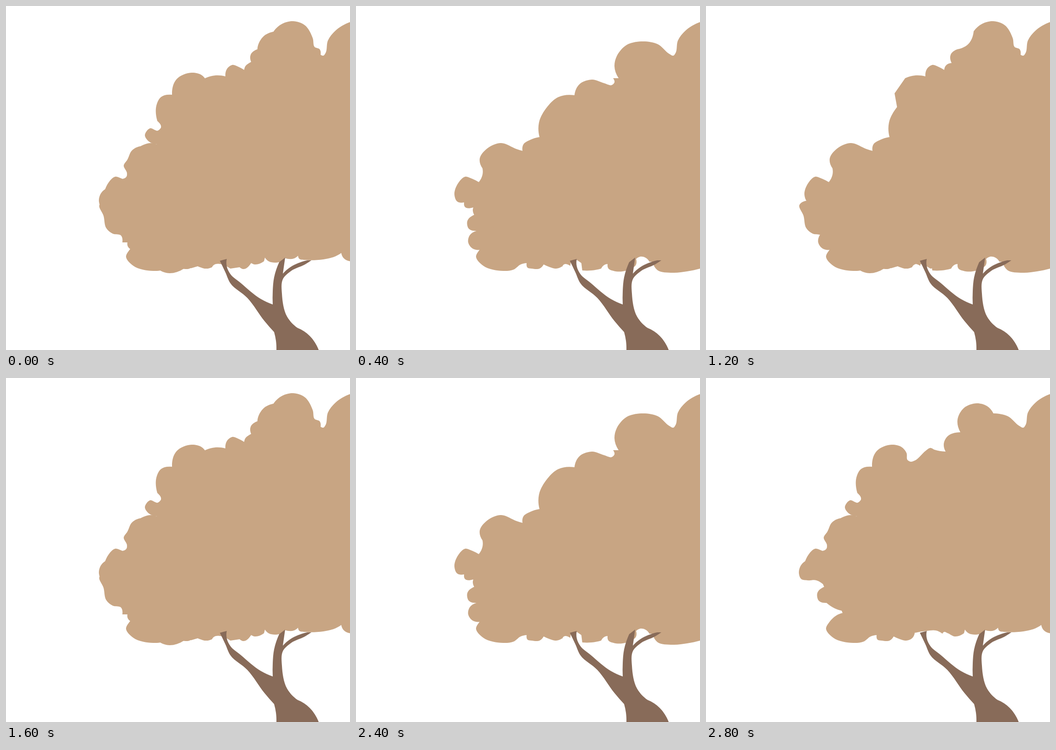
Animation, 748 px wide and 748 px high, one loop 3.2 s. Source, as an HTML page:

```html
<!DOCTYPE html>
<html lang="en">
<head>
<meta charset="utf-8">
<title>Tree</title>
<style>
html, body { margin: 0; width: 100%; height: 100%; overflow: hidden; background: #fff; }
svg { display: block; width: 100%; height: 100%; }
.leaves { fill: #c8a583; }
.trunk { fill: #886b59; }
</style>
</head>
<body>
<!-- Knots are joined by a smooth curve; a slash makes the knot before it a corner. -->
<svg viewBox="0 0 748 748">
  <g class="leaves">
    <path data-knots="748 35 716 54 700 75 695 102 690 108 681 104 656 83 620 77 588 85 567 109 562 131 571 157 / 559 157 /
      562 166 556 172 540 168 513 160 486 170 475 194 / 440 198 416 219 398 253 399 285 / 379 291 364 301 362 315 /
      349 311 315 298 285 310 269 332 275 353 / 275 367 267 383 / 251 375 238 371 221 387 214 410 220 425 235 427 /
      237 437 255 438 / 254 445 257 454 / 748 454"/>
    <path data-knots="748 440 / 257 454 / 242 468 245 484 262 489 / 280 501 295 506 / 297 511 / 284 516 268 531 261 545
      277 565 320 576 343 573 358 562 371 559 / 373 569 382 571 399 571 408 562 / 422 568 435 571 448 566 454 554 /
      480 535 / 748 535"/>
    <g id="low">
      <path data-knots="310 480 / 262 489 / 247 499 244 514 253 527 271 530 / 310 525"/>
      <path data-knots="440 530 / 448 568 / 452 562 466 565 / 467 556 / 480 552 / 490 559 / 492 575 / 512 575 533 571 /
        540 563 547 561 / 549 571 560 576 580 577 605 567 / 609 562 609 550 / 618 545 629 547 638 556 / 645 556 /
        655 574 689 580 720 577 748 571 / 748 530"/>
    </g>
    <g id="full">
      <path data-knots="625 77 611 61 589 55 561 65 547 90 553 118 / 524 128 517 144 521 160 / 497 156 488 152 478 158
        455 179 445 182 438 178 436 163 425 150 403 145 371 159 361 193 / 337 198 328 213 329 250 /
        337 264 330 271 313 266 302 281 310 294 329 301 / 292 305 / 274 314 264 334 256 347 263 363 262 371 253 376 /
        240 390 / 216 398 / 206 408 202 424 207 437 221 440 240 440 258 452 / 310 500 / 650 300 / 650 150"/>
      <path data-knots="440 500 / 455 554 / 479 550 500 549 514 556 / 518 552 526 555 541 562 561 555 / 563 547 /
        571 555 586 558 601 554 606 548 / 626 549 635 543 / 638 550 648 552 690 551 712 546 729 537 /
        734 548 748 555 / 748 500"/>
    </g>
    <g id="tufts">
      <path data-knots="684 106 / 682 94 671 89 667 70 650 42 624 33 600 39 582 55 / 571 82 547 94 / 532 106 534 124 /
        522 129 518 139 / 505 132 493 128 481 136 477 153 / 455 151 433 157 / 410 190 / 430 300 / 620 300"/>
      <path data-knots="300 400 / 225 422 / 203 433 212 456 218 483 232 495 250 499 253 514 / 264 514 / 265 523 273 530 /
        330 550 / 335 575 / 355 581 387 571 / 403 570 / 420 565 / 434 571 448 568 / 452 563 475 563 / 488 571 /
        508 568 / 516 572 533 559 / 540 500 / 540 400"/>
    </g>
  </g>
  <path class="trunk" data-knots="465 554 / 480 550 / 480 566 488 583 510 602 554 637 580 649 / 580 620 583 590 594 557 /
    607 547 / 602 582 / 618 568 655 553 / 664 553 / 650 562 620 576 602 594 600 626 611 675 634 700 / 660 717 680 748 /
    588 748 / 587 728 583 709 / 562 685 525 635 488 603 477 579 465 554"/>
</svg>
<script>
const mix = (a, b, s, t) => a.map((v, i) => v * s + b[i] * t);

// Cubic segments through the points, with tangents weighted by spacing.
function curve(points) {
  const gaps = points.slice(1).map((p, i) => Math.hypot(p[0] - points[i][0], p[1] - points[i][1]) ** 0.8);
  const speeds = gaps.map((h, i) => mix(points[i + 1], points[i], 1 / h, -1 / h));
  const last = gaps.length;
  const tangents = [];
  for (let i = 1; i < last; i++) {
    const sum = gaps[i - 1] + gaps[i];
    tangents[i] = mix(speeds[i - 1], speeds[i], gaps[i] / sum, gaps[i - 1] / sum);
  }
  tangents[0] = last > 1 ? mix(speeds[0], tangents[1], 2, -1) : speeds[0];
  tangents[last] = last > 1 ? mix(speeds[last - 1], tangents[last - 1], 2, -1) : speeds[0];
  return gaps.map((h, i) => 'C' + [
    mix(points[i], tangents[i], 1, h / 3),
    mix(points[i + 1], tangents[i + 1], 1, -h / 3),
    points[i + 1]
  ].join(' ')).join('');
}

function outline(knots) {
  const runs = knots.split('/').map(run => run.match(/\d+ \d+|\d+\s+\d+/g).map(p => p.split(/\s+/).map(Number)));
  let pen = runs[0][0];
  let d = 'M' + pen;
  runs.forEach((run, i) => {
    const points = i ? [pen, ...run] : run;
    if (points.length > 1) d += curve(points);
    pen = run[run.length - 1];
  });
  return d + 'Z';
}

for (const path of document.querySelectorAll('path')) path.setAttribute('d', outline(path.dataset.knots));

// One digit per 400 ms step: 1 shows the layer, 0 hides it.
const steps = { low: '01010110', full: '10101001', tufts: '10011100' };

for (const [id, pattern] of Object.entries(steps)) {
  const states = [...pattern, pattern[0]];
  const frames = states.map((opacity, i) => ({ opacity, offset: i / pattern.length, easing: 'step-end' }));
  document.getElementById(id).animate(frames, { duration: 400 * pattern.length, iterations: Infinity });
}
</script>
</body>
</html>
```
